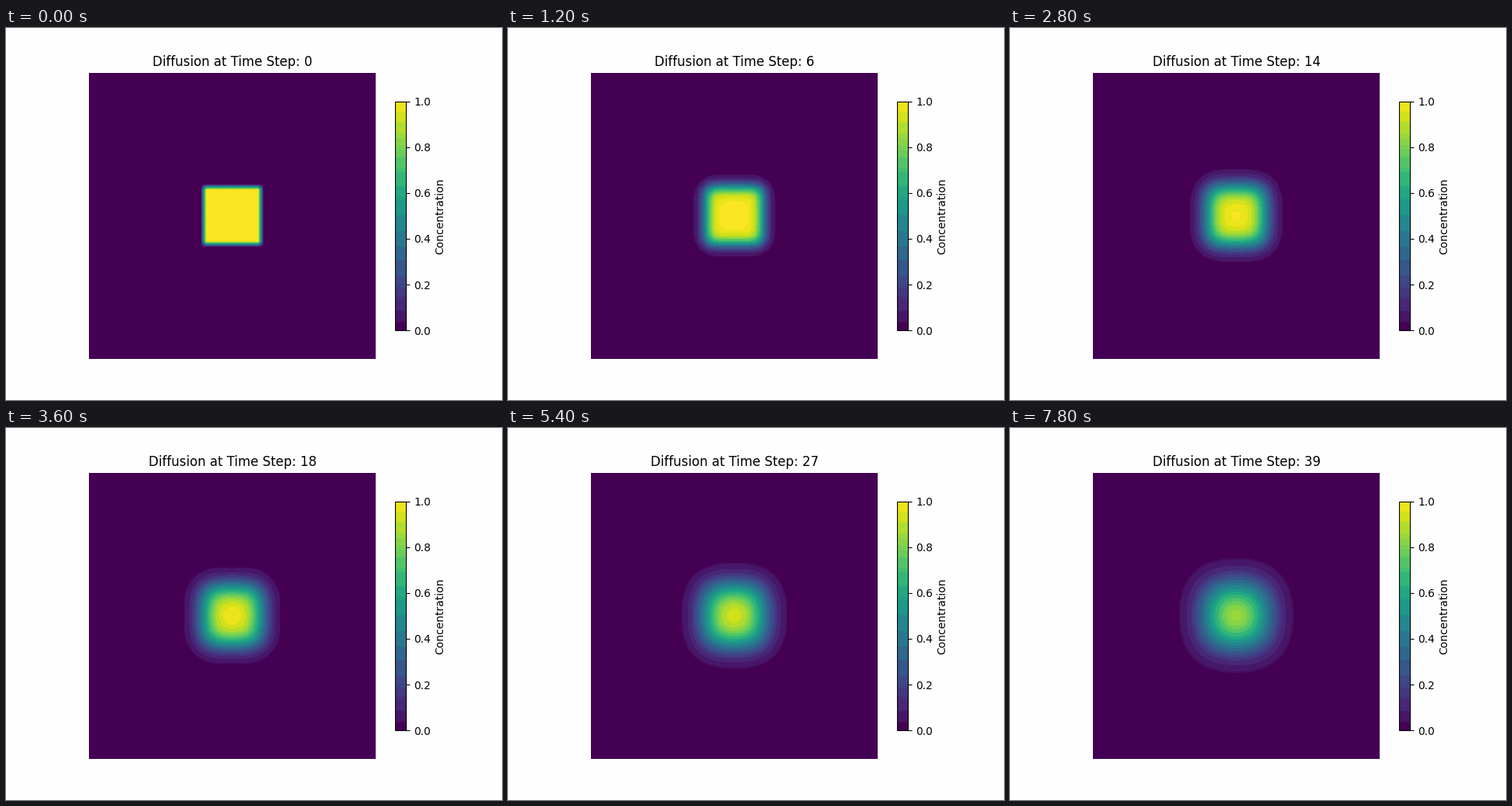
Animation of 640x480 px, one loop 8000 ms. Source, as a matplotlib script:

```python
import matplotlib.pyplot as plt
import numpy as np
from matplotlib.animation import FuncAnimation
from matplotlib.colors import ListedColormap

SIZE = 50
STEPS = 40
RATE = 0.1  # D * dt / dx^2
PAPER = "#fefefe"


def banded_viridis():
    """Viridis reduced to flat bands: 3 bits red, 4 bits green, 3 bits blue."""
    rgb = (plt.get_cmap("viridis")(np.arange(256))[:, :3] * 255).astype(int)
    key = (rgb[:, 0] // 32) * 256 + (rgb[:, 1] // 16) * 16 + rgb[:, 2] // 32
    bands = np.empty((256, 3))
    for k in np.unique(key):
        bands[key == k] = rgb[key == k].mean(axis=0).astype(int)
    bands[key == key[0]] = rgb[0]
    return ListedColormap(bands / 255)


def diffuse(u):
    laplacian = sum(np.roll(u, s, axis) for s in (-1, 1) for axis in (0, 1)) - 4 * u
    return u + RATE * laplacian


u = np.zeros((SIZE, SIZE))
u[20:30, 20:30] = 1.0
fields = [u]
for _ in range(STEPS - 1):
    fields.append(diffuse(fields[-1]))

fig, ax = plt.subplots(figsize=(6.4, 4.8), dpi=100, facecolor=PAPER)
image = ax.imshow(fields[0], cmap=banded_viridis(), vmin=0, vmax=1,
                  interpolation="bilinear")
fig.colorbar(image, ax=ax, shrink=0.8, label="Concentration")
ax.axis("off")
title = ax.set_title("")


def update(step):
    image.set_data(fields[step])
    title.set_text(f"Diffusion at Time Step: {step}")
    return image, title


anim = FuncAnimation(fig, update, frames=STEPS, interval=200, repeat=True,
                     repeat_delay=0, blit=False)
plt.show()
```
